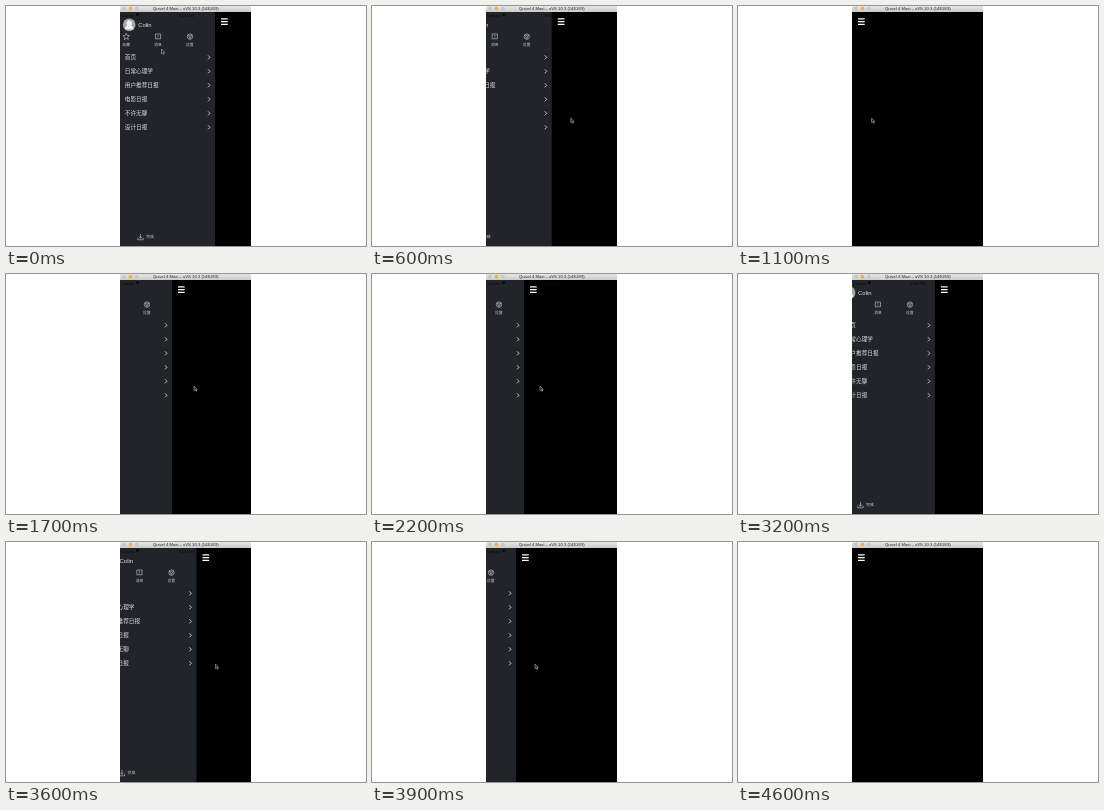
An HTML page for the animation above (6000 ms loop, 360 by 240 pixels).

```html
<!DOCTYPE html>
<html lang="zh">
<head>
<meta charset="utf-8">
<title>Sliding drawer</title>
<style>
  html, body { margin: 0; width: 100%; height: 100%; overflow: hidden; background: #fff; }
  svg { display: block; width: 360px; height: 240px; }
  text { font-family: "Liberation Sans", "Noto Sans CJK SC", "Noto Sans CJK", sans-serif; fill: #e2e3e5; }
  .row { font-size: 5.65px; font-weight: 500; }
  .small { font-size: 3.8px; font-weight: 500; fill: #cfd1d3; }
  .mid { text-anchor: middle; }
  .line { fill: none; stroke: #b4b8bb; stroke-width: .7; }
  .chevron { fill: none; stroke: #e2e3e5; stroke-width: .8; }
  .status text { font-size: 4.2px; fill: #08090a; }
</style>
</head>
<body>
<svg viewBox="0 0 360 240">
  <defs>
    <linearGradient id="bar" x2="0" y2="1">
      <stop stop-color="#e6e6e6"/><stop offset="1" stop-color="#cbcbcb"/>
    </linearGradient>
    <clipPath id="window"><rect x="114" width="131" height="240"/></clipPath>
  </defs>
  <g clip-path="url(#window)">
    <rect x="114" width="131" height="240"/>
    <path id="burger" d="M120 12.9h6.7M120 15.6h6.7M120 18.3h6.7" stroke="#fff" stroke-width="1.2"/>
    <g id="drawer">
      <rect x="114" y="6" width="95" height="234" fill="#212529"/>
      <circle cx="123.2" cy="18.7" r="6.3" fill="#a5a8aa"/>
      <circle cx="123.2" cy="17.2" r="2.8" fill="#f0f0f0"/>
      <path d="M119 23.2a4.2 4 0 0 1 8.4 0z" fill="#f0f0f0"/>
      <text x="132.2" y="21" font-size="5.9">Colin</text>
      <g class="line">
        <path d="M120.2 27.2l1 2.2 2.3.2-1.8 1.6.6 2.3-2.1-1.2-2.1 1.2.6-2.3-1.8-1.6 2.3-.2z"/>
        <path d="M149.4 28h5.2v4.8h-5.2zM152 29v1.6M152 31.2v.6"/>
        <circle cx="184" cy="30.6" r="2.7"/>
        <circle cx="184" cy="30.6" r="1.1"/>
        <path d="M181.6 29.2l1.4.8M186.4 29.2l-1.4.8M184 33.3v-1.6"/>
        <path d="M134.5 228v4.2M132.8 230.6l1.7 1.7 1.7-1.7M131.8 231.8v2h5.4v-2"/>
      </g>
      <text class="small mid" x="120.2" y="40.2">收藏</text>
      <text class="small mid" x="152" y="40.2">消息</text>
      <text class="small mid" x="183.8" y="40.2">设置</text>
      <text class="small" x="140.2" y="232.2">完成</text>
    </g>
    <g class="status">
      <text x="115.5" y="10.6">Carrier</text>
      <path d="M129.5 8.3q2-1.5 4 0l-2 2.3z" fill="#08090a"/>
      <text class="mid" x="180" y="10.6">9:50 PM</text>
    </g>
    <rect x="114" width="131" height="6" fill="url(#bar)"/>
    <circle cx="118" cy="2.6" r="1.9" fill="#c6c6c6"/>
    <circle cx="124.5" cy="2.6" r="1.9" fill="#efb04c"/>
    <circle cx="130.8" cy="2.6" r="1.9" fill="#c6c6c6"/>
    <text class="mid" x="179.8" y="4.2" font-size="4.2" style="fill:#222">Quivel 4 Maxi – uVS 10.3 (14E269)</text>
    <path id="cursor" d="M0 0v4.6l1.1-.9.8 1.7.8-.4-.8-1.6h1.3z" fill="#111" stroke="#b8b8b8" stroke-width=".6"/>
  </g>
</svg>
<script>
const LOOP = 6000, STEP = 100, OPEN = 95, POINTER_LIMIT = 235;
const $ = id => document.getElementById(id);

["首页", "日常心理学", "用户推荐日报", "电影日报", "不许无聊", "设计日报"].forEach((label, i) => {
  const y = 51.3 + i * 14;
  $("drawer").insertAdjacentHTML("beforeend",
    `<text class="row" x="118.8" y="${y + 2.1}">${label}</text>
     <path class="chevron" d="M202 ${y - 2}l2 2-2 2"/>`);
});

// Drags alternately close and open the drawer; x is the pointer's place when the drawer is closed.
const drags = [
  { start: 400, length: 650, x: 133, y: 112 },
  { start: 1300, length: 731, x: 136, y: 112 },
  { start: 2050, length: 250, x: 130, y: 112 },
  { start: 2520, length: 779, x: 157, y: 126 },
  { start: 3480, length: 614, x: 133, y: 122 },
];
const rest = { end: 0, x: 60.5, y: 43 };
const exit = { start: 4200, x: 250, y: 122 };

const ramp = (t, from, to) => Math.min(1, Math.max(0, (t - from) / (to - from)));
const move = (id, x, y = 0) => $(id).setAttribute("transform", `translate(${x} ${y})`);

const endOf = drag => drag.start + drag.length;

function drawerOffset(t) {
  return OPEN * drags.reduce((open, drag, i) =>
    open + (i % 2 ? 1 : -1) * ramp(t, drag.start, endOf(drag)), 1);
}

// Between drags the pointer glides to the next grab point.
function pointer(t) {
  let { x, y, end } = rest, px = x, py = y;
  for (const next of [...drags, exit]) {
    const k = ramp(t, end, next.start);
    px += (next.x - x) * k;
    py += (next.y - y) * k;
    ({ x, y } = next);
    end = endOf(next);
  }
  return [px + drawerOffset(t), py];
}

function draw(now) {
  const t = Math.floor((now % LOOP) / STEP) * STEP;
  const offset = drawerOffset(t), [x, y] = pointer(t);
  move("drawer", offset - OPEN);
  move("burger", offset);
  move("cursor", x, y);
  $("cursor").style.visibility = x > POINTER_LIMIT ? "hidden" : "visible";
}

const start = performance.now();
function tick() {
  draw(performance.now() - start);
  requestAnimationFrame(tick);
}
tick();
</script>
</body>
</html>
```
